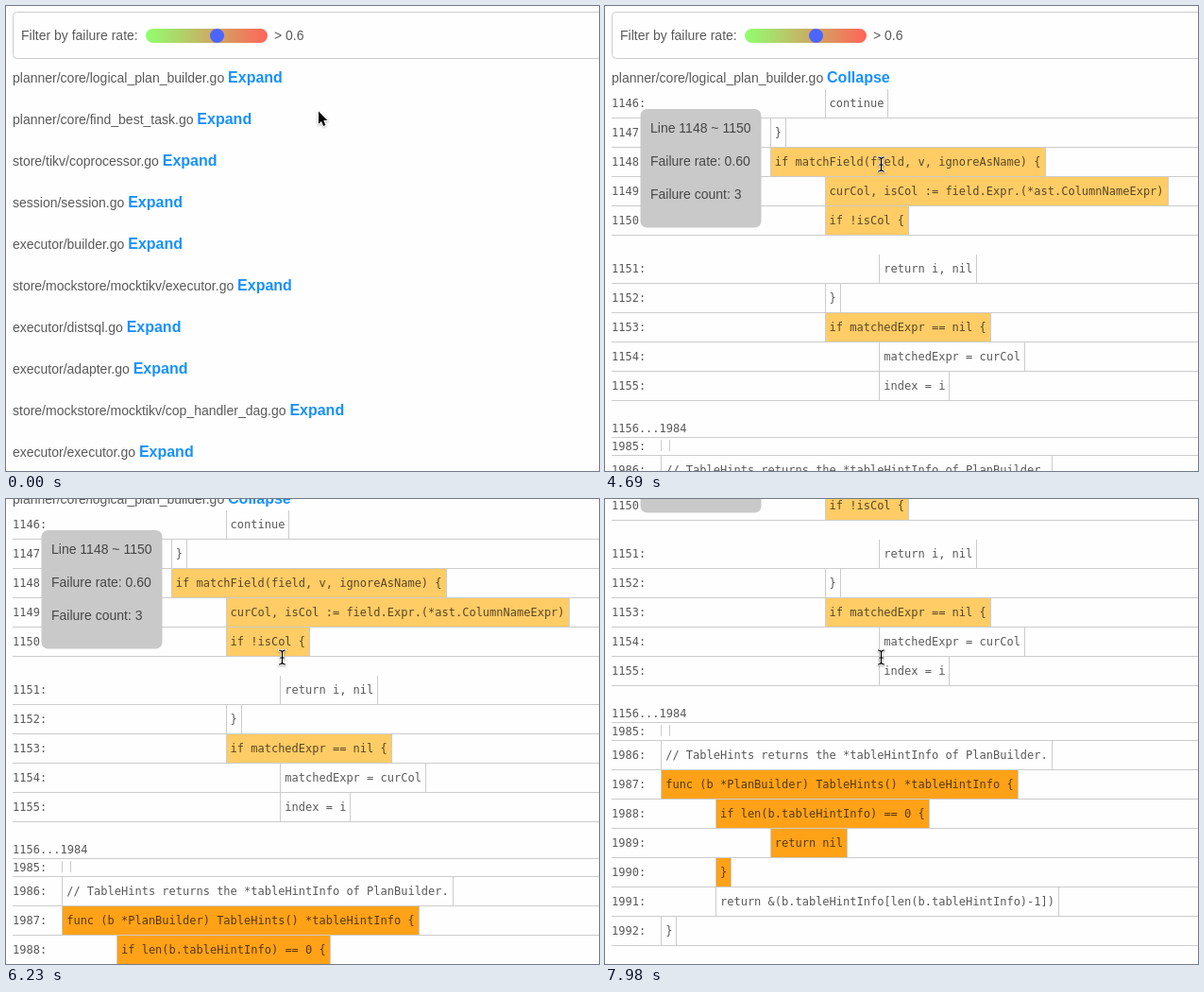
An HTML page that plays this animation: 628 by 492 pixels, repeating every 8 s.

```html
<!DOCTYPE html>
<html lang="en">
<head>
<meta charset="utf-8">
<style>
  html, body { margin: 0; width: 100%; height: 100%; overflow: hidden; background: #fefefe; }
  svg { display: block; }
  text { font: 14px "Liberation Sans", Arial, sans-serif; fill: rgba(0, 0, 0, .65); white-space: pre; }
  .code { font: 12px "DejaVu Sans Mono", monospace; }
  .link { font-size: 16px; font-weight: bold; fill: #1890ff; }
  .link.hover { fill: #40a9ff; }
  .rule { fill: #ccc; }
</style>
</head>
<body>
<svg width="628" height="492" viewBox="0 0 628 492">
  <defs>
    <linearGradient id="rate">
      <stop stop-color="#90ff70"/>
      <stop offset="1" stop-color="#ff6459"/>
    </linearGradient>
  </defs>
  <g id="page">
    <rect x="7.5" y="6.5" width="640" height="49" rx="4" fill="none" stroke="#ccc"/>
    <text x="16" y="36">Filter by failure rate:</text>
    <rect x="148" y="24" width="129" height="15" rx="7.5" fill="url(#rate)"/>
    <circle cx="223.5" cy="31.5" r="7.5" fill="#4b66ff"/>
    <text x="284" y="36">&gt; 0.6</text>
    <g id="files"></g>
    <g id="code"></g>
    <g id="tip">
      <rect x="37.5" y="109" width="128" height="125.5" rx="7" fill="#c9c9c9"/>
      <text x="48" y="134">Line 1148 ~ 1150</text>
      <text x="48" y="169">Failure rate: 0.60</text>
      <text x="48" y="204">Failure count: 3</text>
    </g>
  </g>
  <g id="cursor" stroke-linejoin="round" style="filter: drop-shadow(0 1px 1px rgba(0,0,0,.3))">
    <path id="arrow" d="M0 0V13.2L3 10.4 5.2 15.4 7.4 14.5 5.3 9.6H9.4Z" stroke="#fff" stroke-width="2" paint-order="stroke"/>
    <path id="hand" d="M-1.5 9V1Q0-1 1.5 1V6Q3 4.500 4.300 6.200 5.800 5.200 6.800 7 8.600 6.400 8.800 8.200V11Q8.500 13 7 15H0Q-2-1.500 -1.500 9ZM-1.500 10Q-4 6.500 -5 8T-2 13L0 15H2Z" fill="#fff" stroke="#000"/>
    <g id="beam" fill="none" stroke-linecap="round">
      <path d="M-2.500-7Q0-7 .5-5 1-7 3.500-7M.5-5V6M-1.500 1H2.500M-2.500 8Q0 8 .5 6 1 8 3.500 8" stroke="#fff" stroke-width="2.600"/>
      <path d="M-2.500-7Q0-7 .5-5 1-7 3.500-7M.5-5V6M-1.500 1H2.500M-2.500 8Q0 8 .5 6 1 8 3.500 8" stroke="#000" stroke-width="1.200"/>
    </g>
  </g>
</svg>
<script>
const $ = id => document.getElementById(id);

function add(parent, tag, attrs, content = '') {
  const el = document.createElementNS('http://www.w3.org/2000/svg', tag);
  for (const key in attrs) el.setAttribute(key, attrs[key]);
  el.textContent = content;
  return parent.appendChild(el);
}

const paths = [
  'planner/core/logical_plan_builder.go', 'planner/core/find_best_task.go',
  'store/tikv/coprocessor.go', 'session/session.go', 'executor/builder.go',
  'store/mockstore/mocktikv/executor.go', 'executor/distsql.go', 'executor/adapter.go',
  'store/mockstore/mocktikv/cop_handler_dag.go', 'executor/executor.go'
];
const files = paths.map((path, i) => {
  const row = add($('files'), 'text', { x: 7, y: 81 + 44 * i }, path + ' ');
  return { row, link: add(row, 'tspan', { class: 'link' }, 'Expand') };
});

const AMBER = '#ffcc66', ORANGE = '#ffa218', CHAR = 7.224;
const rect = (x, y, width, height, attrs) =>
  add($('code'), 'rect', { x, y, width, height, ...attrs });
const rule = (x, y, width, height) => rect(x, y, width, height, { class: 'rule' });
const codeText = (x, y, s) => add($('code'), 'text', { x, y, class: 'code' }, s);

// One source line: `bottom` is the y of its separator.
function codeLine(number, bottom, indent, source, fill, height = 30) {
  const x = 59.2 + indent * 8 * CHAR;
  const left = Math.round(x), right = Math.round(x + 9 + source.length * CHAR);
  const top = bottom - height;
  if (fill) rect(left, top, right - left + 1, height, { fill });
  const cellHeight = source ? height : 12;
  const cellTop = source ? top : top + 2;
  rule(left, cellTop, 1, cellHeight);
  rule(right, cellTop, 1, cellHeight);
  rule(7, bottom, 621, 1);
  codeText(7, source ? bottom - 11 : bottom - 5, number + ':');
  codeText(x + 5, bottom - 11, source);
}

const block = (first, bottom, lines) =>
  lines.forEach((line, i) => codeLine(first + i, bottom + 31 * i, ...line));

block(1146, 118, [
  [3, 'continue'],
  [2, '}'],
  [2, 'if matchField(field, v, ignoreAsName) {', AMBER],
  [3, 'curCol, isCol := field.Expr.(*ast.ColumnNameExpr)', AMBER],
  [3, 'if !isCol {', AMBER]
]);
block(1151, 293, [
  [4, 'return i, nil'],
  [3, '}'],
  [3, 'if matchedExpr == nil {', AMBER],
  [4, 'matchedExpr = curCol'],
  [4, 'index = i']
]);
codeText(7, 451, '1156...1984');
rule(7, 456, 621, 1);
codeLine(1985, 475, 0, '', null, 18);
block(1986, 506, [
  [0, '// TableHints returns the *tableHintInfo of PlanBuilder.'],
  [0, 'func (b *PlanBuilder) TableHints() *tableHintInfo {', ORANGE],
  [1, 'if len(b.tableHintInfo) == 0 {', ORANGE],
  [2, 'return nil', ORANGE],
  [1, '}', ORANGE],
  [1, 'return &(b.tableHintInfo[len(b.tableHintInfo)-1])'],
  [0, '}']
]);

// Bursts of movement: start, end, number of steps.
const bursts = [
  [1020, 1080, 2], [1320, 1540, 5], [1900, 2630, 14],
  [3860, 4690, 15], [5470, 7570, 37], [7750, 7980, 5]
];
const pointer = [
  [0, 331, 111.5], [960, 331, 111.5], [1080, 329, 110.5], [1265, 329, 110.5],
  [1400, 322, 109.5], [1540, 318, 110.5], [1844, 318, 110.5], [2180, 291, 98.5],
  [2630, 266, 76], [3800, 266, 76], [4690, 292, 167]
];
const scroll = [
  [5412, 0], [5940, 45], [6580, 114], [7220, 172], [7570, 200], [7692, 200], [7980, 220]
];

function snap(t) {
  let time = 0;
  for (const [start, end, steps] of bursts) {
    if (t < start) break;
    const step = (end - start) / (steps - 1);
    time = Math.min(end, start + Math.floor((t - start) / step + .1) * step);
  }
  return time;
}

function track(points, t) {
  const i = points.findIndex(p => p[0] > t);
  if (i < 0) return points[points.length - 1].slice(1);
  if (i === 0) return points[0].slice(1);
  const a = points[i - 1], b = points[i], k = (t - a[0]) / (b[0] - a[0]);
  return a.slice(1).map((v, n) => v + (b[n + 1] - v) * k);
}

const show = (el, on) => { el.style.display = on ? '' : 'none'; };

function draw(t) {
  const time = snap(t), open = t >= 3220;
  const [x, y] = track(pointer, time);
  const [offset] = track(scroll, time);
  const { link } = files[0];
  const hover = y < 86 && x < 302;

  $('page').setAttribute('transform', `translate(0 ${-Math.round(offset)})`);
  $('cursor').setAttribute('transform', `translate(${Math.round(x)} ${Math.round(y * 2) / 2})`);
  link.textContent = open ? 'Collapse' : 'Expand';
  link.classList.toggle('hover', hover);
  files.slice(1).forEach(file => show(file.row, !open));
  show($('code'), open);
  show($('tip'), open && y > 150);

  const kind = hover ? 'hand' : open && y > 88 ? 'beam' : 'arrow';
  for (const id of ['arrow', 'hand', 'beam']) show($(id), id === kind);
}

function frame() {
  draw(performance.now() % 8000);
  requestAnimationFrame(frame);
}
frame();
</script>
</body>
</html>
```
